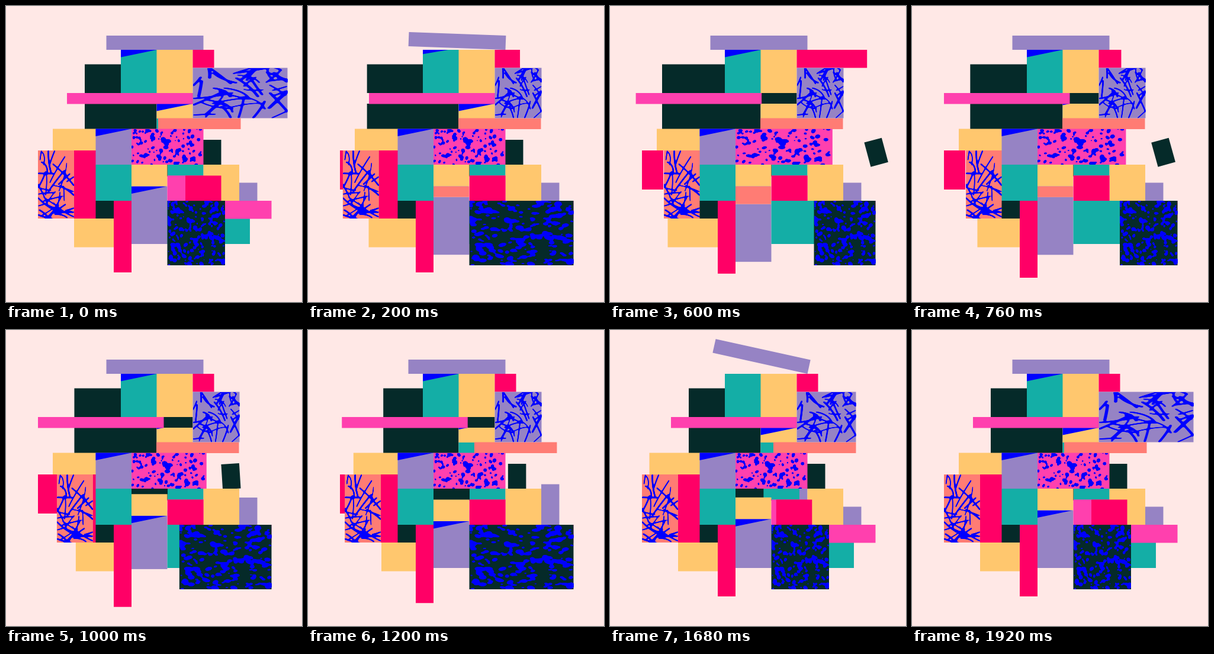
An HTML page with a canvas that plays this animation: 500 px wide and 500 px high, repeating every 1.96 s.

```html
<!DOCTYPE html>
<html>
<head>
<meta charset="utf-8">
<style>
html, body { margin: 0; width: 100%; height: 100%; overflow: hidden; background: #ffe8e6; }
canvas { display: block; width: 500px; height: 500px; }
</style>
</head>
<body>
<canvas id="stage" width="500" height="500"></canvas>
<script>
const LOOP = 1960, STEP = 40;
const BG = '#ffe8e6', LAV = '#9683c4', TEAL = '#14aea6', SAND = '#ffc76e', RED = '#ff0066',
      DARK = '#052a29', PINK = '#ff40ae', CORAL = '#ff7c74', BLUE = '#0000ff';
const ctx = document.getElementById('stage').getContext('2d');
let t = 0;

// Eased 0 to 1 between two times, and the same with a way back.
function ramp(from, to) {
  const u = Math.min(1, Math.max(0, (t - from) / (to - from)));
  return u * u * (3 - 2 * u);
}
const swing = (from, to, back, rest) => ramp(from, to) - ramp(back, rest);

function random(seed) {
  return () => (seed = (seed * 16807) % 2147483647) / 2147483647;
}

// Blue ink whose shapes melt together: blur the drawing, then sharpen its alpha.
function ink(w, h, seed, paint) {
  const S = 4, make = () => {
    const c = document.createElement('canvas');
    c.width = w * S;
    c.height = h * S;
    return c;
  };
  const raw = make(), out = make(), g = raw.getContext('2d'), o = out.getContext('2d');
  g.scale(S, S);
  g.lineCap = 'round';
  paint(g, random(seed), w, h);
  o.filter = `blur(${S * 0.9}px)`;
  o.drawImage(raw, 0, 0);
  const img = o.getImageData(0, 0, out.width, out.height), p = img.data;
  for (let i = 0; i < p.length; i += 4) {
    p[i] = p[i + 1] = 0;
    p[i + 2] = 255;
    p[i + 3] = (p[i + 3] - 95) * 5;
  }
  o.putImageData(img, 0, 0);
  return out;
}

const veins = (count, reach) => (g, r, w, h) => {
  for (let i = 0; i < count; i++) {
    const x = r() * w, y = r() * h, a = r() * Math.PI, l = reach * (0.4 + 0.6 * r());
    const dx = Math.cos(a) * l, dy = Math.sin(a) * l, bend = (r() - 0.5) * 12;
    g.lineWidth = 1.6 + r() * 1.2;
    g.beginPath();
    g.moveTo(x - dx, y - dy);
    g.quadraticCurveTo(x + bend, y - bend, x + dx, y + dy);
    g.stroke();
  }
};

const blobs = (count, size) => (g, r, w, h) => {
  for (let i = 0; i < count; i++) {
    const s = 1.2 + r() * r() * size;
    g.beginPath();
    g.ellipse(r() * w, r() * h, s * (1 + r() * 0.6), s, r() * Math.PI, 0, 7);
    g.fill();
  }
};

const crack = ink(79, 85, 71, veins(46, 20));
const shard = ink(61, 115, 29, veins(42, 26));
const dots = ink(121, 60, 17, blobs(125, 3));
const spots = ink(97, 109, 43, blobs(240, 3.1));

function box(color, x, y, w, h) {
  ctx.fillStyle = color;
  ctx.fillRect(x, y, w, h);
}

function print(color, pattern, x, y, w, h) {
  box(color, x, y, w, h);
  ctx.drawImage(pattern, x, y, w, h);
}

// Slanted shadow cast by the piece above.
function shadow(x, y, w = 60.5, depth = w * 0.205) {
  if (w <= 0 || depth <= 0) return;
  ctx.fillStyle = BLUE;
  ctx.beginPath();
  ctx.moveTo(x, y);
  ctx.lineTo(x + w, y);
  ctx.lineTo(x, y + depth);
  ctx.fill();
}

// A box turned about the pivot (px, py), placed relative to it.
function turned(color, px, py, deg, x, y, w, h) {
  ctx.save();
  ctx.translate(px, py);
  ctx.rotate(deg * Math.PI / 180);
  box(color, x, y, w, h);
  ctx.restore();
}

function drawTop() {
  const tilt = 2.2 * swing(0, 180, 180, 380) + 13.2 * swing(1560, 1700, 1700, 1900);
  const lift = Math.tan(tilt * Math.PI / 180), depth = 12.4 - 139.5 * lift;
  const dark = 133 - 55 * swing(0, 350, 290, 1430);
  const bar = 103 - 49 * swing(460, 580, 1135, 1550) - 11 * swing(500, 580, 580, 720);
  const coral = 257 - 3 * ramp(0, 80) + 63 * ramp(1060, 1370) - 60 * ramp(1380, 1860);

  turned(LAV, 333.5, 74, tilt, -164, -24, 164, 24);
  box(DARK, dark, 98.5, 194 - dark, 48.5);
  box(DARK, dark, 165, 254.5 - dark, 43);
  box(DARK, 254, 147, 61.5, 19);
  box(TEAL, 194, 74, 61, 73);
  shadow(194, 74, depth / (0.205 - lift), depth);
  box(SAND, 254.5, 74, 61, 73);
  box(RED, 315.5, 74, 36 + 98 * swing(155, 440, 540, 780), 30.5);
  box(SAND, 254.5, 165, 61, 25);
  shadow(254.5, 165, bar + 212.5 - 254.5);
  box(TEAL, 254.5, 190, 61, 18);
  box(CORAL, coral, 189.5, 139.5, 18.5);
  print(LAV, crack, 315.5, 104.5, 160 - 81 * swing(0, 160, 1600, 1840), 85);
  box(PINK, bar, 147, 212.5, 18.5);
}

function drawLeft() {
  const sand = 79 - 30 * swing(1160, 1400, 1380, 1920);
  const low = 115 - 25 * swing(0, 400, 440, 880) + 9 * swing(880, 1200, 1200, 1520);

  box(SAND, sand, 207.5, 152 - sand, 36.5);
  turned(RED, 72, 277, 8 * swing(220, 330, 330, 500), -18, -33, 36, 66);
  box(RED, 115, 244, 37, 115);
  print(CORAL, shard, 54 + 37 * swing(130, 440, 900, 1330), 244, 61, 115);
  box(LAV, 151.5, 207.5, 61, 61);
  shadow(151.5, 207.5);
  box(TEAL, 151.5, 268, 60.5, 61);
  box(DARK, 151.5, 329, 31, 30);
  box(SAND, low, 359, 182 - low, 48.5);
  box(RED, 182, 329, 30, 121 + 18 * swing(480, 1040, 1100, 1340));
}

function drawMiddle() {
  const drop = 35 * swing(0, 390, 450, 1090);
  const slide = 18.5 * swing(900, 1100, 1600, 1880);
  const tileTilt = 3 * swing(300, 440, 440, 520) - 15.6 * swing(440, 620, 740, 1120);

  turned(DARK, 348 + 114 * swing(320, 590, 414, 1312), 247, tileTilt, -15, -21, 30.5, 42.5);
  print(PINK, dots, 212, 207.5, 121.5 + 47.5 * swing(260, 460, 460, 1140), 61);
  box(LAV, 212, 304.5 + drop, 60.5, 97.5);
  shadow(212, 304.5 + slide);
  box(CORAL, 212, 304.5, 60.5, drop);
  box(DARK, 212, 268, 61, 20);
  box(LAV, 273, 268, 60.5, 19);
  box(TEAL, 273 - 23 * swing(1220, 1500, 1540, 1860), 268, 60.5, 18.5);
  box(SAND, 212, 268 + slide, 60.5, 36.5);
  box(SAND, 333.5, 268, 60.5, 61);
  box(PINK, 272.5, 286.5, 61, 42.5);
  box(RED, 303 - 30 * swing(0, 180, 1580, 1880), 286.5, 60.5, 42.5);
}

function drawLowerRight() {
  const tower = 298.5 - 38 * swing(860, 1180, 1220, 1625);
  const left = 272.5 + 78.5 * swing(390, 645, 800, 1100);
  const right = 370 + 78.5 * swing(0, 180, 1240, 1590);

  box(LAV, 394, tower, 30.5, 329 - tower);
  box(TEAL, 272.5, 329, Math.min(right + 42, 448) - 272.5, 73);
  box(PINK, 360, 329, 88.5, 30.5);
  print(DARK, spots, left, 329, right - left, 109);
}

const start = performance.now();

function frame() {
  t = Math.floor((performance.now() - start) % LOOP / STEP) * STEP;
  box(BG, 0, 0, 500, 500);
  drawTop();
  drawLeft();
  drawMiddle();
  drawLowerRight();
  requestAnimationFrame(frame);
}
frame();
</script>
</body>
</html>
```
